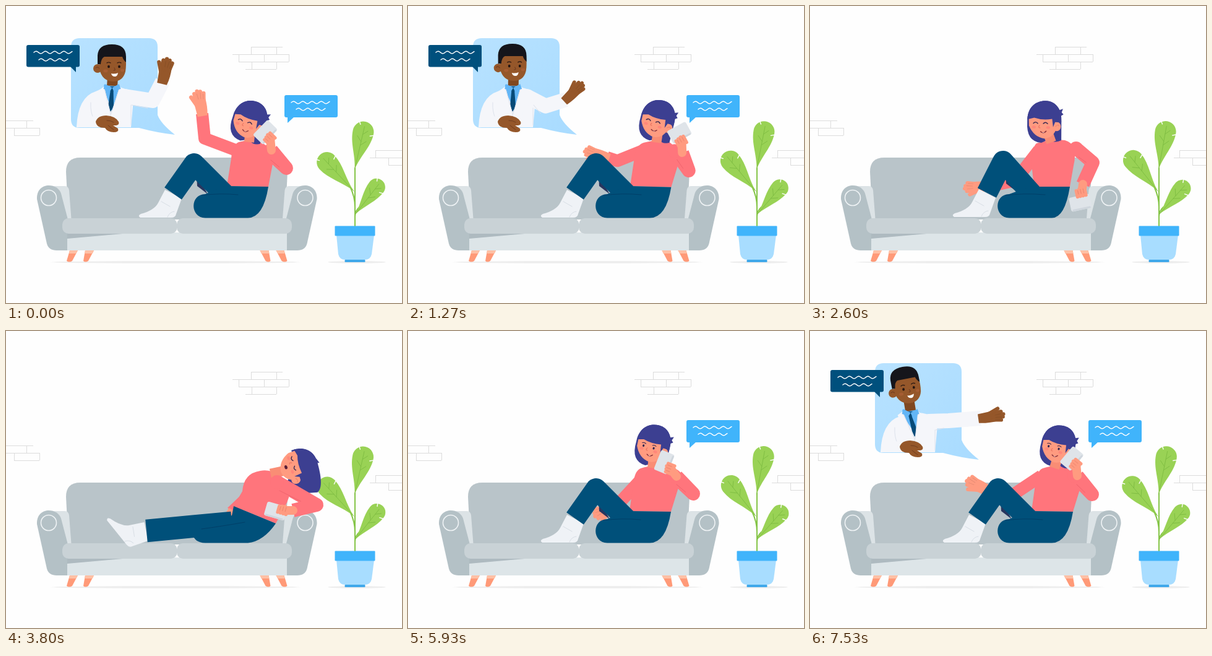
An HTML page with a canvas for the animation above (7.6 s loop, 640x480 px).

```html
<!DOCTYPE html>
<html lang="en">
<head>
<meta charset="utf-8">
<title>Call from the sofa</title>
<style>
html, body { margin: 0; width: 100%; height: 100%; overflow: hidden; background: #fefefe; }
canvas { display: block; }
</style>
</head>
<body>
<canvas id="stage" width="640" height="480"></canvas>
<script>
const c = document.getElementById('stage').getContext('2d');
const LOOP = 7600, RAD = Math.PI / 180;
const SKIN = '#ff9b80', SHIRT = '#ff757c', HAIR = '#3c3f91', JEANS = '#00507a', BROWN = '#95572a', COAT = '#f5f6fa';

// drawing helpers
const fill = (color, d) => { c.fillStyle = color; c.fill(new Path2D(d)); };
const line = (color, w, d, cap = 'round') => {
  c.strokeStyle = color; c.lineWidth = w; c.lineCap = cap; c.lineJoin = 'round';
  c.stroke(new Path2D(d));
};
const oval = (color, x, y, rx, ry = rx, rot = 0) => {
  c.fillStyle = color; c.beginPath(); c.ellipse(x, y, rx, ry, rot, 0, 7); c.fill();
};
const box = (color, x, y, w, h, r = 0) => {
  c.fillStyle = color; c.beginPath(); c.roundRect(x, y, w, h, r); c.fill();
};
function at(x, y, rot, draw, sx = 1, sy = sx) {
  c.save(); c.translate(x, y); c.rotate(rot * RAD); c.scale(sx, sy); draw(); c.restore();
}
const about = (x, y, scale, draw) => {
  if (scale > 0.01) at(x, y, 0, () => { c.translate(-x, -y); draw(); }, scale);
};

// keyframes: numbers, arrays and objects all blend with a smooth step
function mix(a, b, k) {
  if (typeof a === 'number') return a + (b - a) * k;
  if (Array.isArray(a)) return a.map((v, i) => mix(v, b[i], k));
  return Object.fromEntries(Object.keys(a).map(n => [n, mix(a[n], b[n], k)]));
}
function track(keys, t) {
  const i = keys.findIndex(k => k[0] > t);
  if (i < 0) return keys[keys.length - 1][1];
  if (!i) return keys[0][1];
  const [t0, a] = keys[i - 1], [t1, b] = keys[i], k = (t - t0) / (t1 - t0);
  return mix(a, b, k * k * (3 - 2 * k));
}

// torso: neck left, neck right, shoulder, side, waist right, waist left, left side
// left: shoulder, elbow, wrist, hand turn and breadth; right: shoulder, elbow, wrist, hand; phone and head: place, turn
const wave = {
  torso: [376,220, 408,218, 428,226, 432,250, 424,292, 357,291, 364,246],
  left: [374,234, 321,214, 317,174, -10, 1],
  right: [424,235, 453,262, 429,233, 427,214],
  phone: [419,204, 44],
  head: [388,190, 19], drop: 26, open: 0, sleep: 0,
  leg: [352,303, 304,255, 270,303], foot: 0, knee: 304
};
const clap = { ...wave, left: [374,236, 323,203, 294,168, 16, 0.72] };
const hangUp = { ...wave,
  torso: [384,221, 425,219, 440,225, 440,255, 426,293, 360,291, 366,250],
  left: [384,232, 346,273, 335,282, -115, 1],
  right: [434,234, 454,268, 450,239, 450,221],
  phone: [448,205, 70], head: [403,189, 14]
};
const sit = { ...hangUp,
  torso: [366,222, 412,217, 434,223, 426,258, 420,292, 362,292, 358,255],
  left: [370,233, 332,282, 287,292, -92, 0.9],
  right: [430,230, 457,253, 441,288, 439,302],
  phone: [437,318, 78], head: [375,192, 2],
  leg: [358,303, 312,251, 286,302]
};
const asleep = { ...sit,
  torso: [411,226, 442,233, 470,252, 450,285, 436,311, 368,283, 382,259],
  left: [416,239, 386,273, 365,293, -155, 0.9],
  right: [438,244, 502,281, 464,290, 448,290],
  phone: [436,291, 106], head: [464,216, 74], drop: -6, sleep: 1,
  leg: [365,310, 300,316, 227,323], foot: 51, knee: 318
};
const reply = { ...hangUp,
  torso: [376,222, 412,219, 432,226, 438,250, 425,292, 358,291, 364,248],
  right: [430,234, 461,263, 434,235, 424,222],
  phone: [414,212, 22], head: [391,189, 15], open: 1
};
const greet = { ...reply,
  left: [374,234, 326,266, 287,258, -62, 1],
  right: [427,234, 456,264, 432,234, 430,216],
  phone: [423,206, 40], head: [396,190, 15]
};
const girlKeys = [[0, wave], [730, clap], [900, clap], [1500, hangUp], [1880, hangUp], [2500, sit],
  [2720, sit], [3280, asleep], [4900, asleep], [5600, reply], [6400, reply], [7000, greet], [LOOP, greet]];

// doctor: head place and turn, elbow, wrist, hand turn and breadth
const docWave = { head: [173,98, 0], arm: [237,153, 253,122, 14, 1] };
const docClap = { head: [169,97, -2], arm: [224,160, 271,148, 31, 0.72] };
const docRest = { head: [171,97, 0], arm: [222,162, 252,152, 50, 0.9] };
const docReach = { head: [158,93, -11], arm: [224,145, 276,141, 82, 0.9] };
const docKeys = [[0, docWave], [730, docClap], [900, docClap], [1400, docRest], [6800, docRest], [7400, docReach]];

const blueKeys = [[0, 1], [1730, 1], [1900, 0], [5690, 0], [5850, 1.05], [5920, 1]];
const darkKeys = [[0, 1], [1400, 1], [1570, 0], [7270, 0], [7420, 1.16], [7510, 1]];
const callKeys = [[0, 1], [1530, 1], [1730, 0], [6500, 0], [6850, 1]];

function hand(skin, x, y, rot, breadth) {
  at(x, y, rot, () => {
    fill(skin, 'M-8 4L-10 -20Q-8 -28 0 -28L9 -26Q11 -10 8 4Z');
    for (let i = 0; i < 4; i++)
      line(skin, 6.4, `M${-6 + 4 * i} -20L${-7 + 5 * i} ${-38 + Math.abs(i - 1.3) * 3.4}`);
    line(skin, 6.4, 'M-6 -14L-13 -29');
    line('#00000018', 1, 'M-3 -33L-2 -24M3 -34L2 -24M7 -31L6 -23');
  }, breadth, 1);
}

function squiggle(x, y, w) {
  let d = `M${x} ${y}`;
  for (let i = 1; i <= w; i++) d += `L${x + i} ${y - 1.8 * Math.sin(i * 0.42)}`;
  line('#fff', 1.4, d);
}

function bricks() {
  line('#dcdcdc', 1, 'M396 66.5H447M366 78.5H457M376 90.5H457M387 102.5H437' +
    'M396.5 66V78M437.5 66V78M376.5 78V90M417.5 78V90M457.5 78V90M397.5 90V102M437.5 90V102' +
    'M0 185.5H44M0 197.5H54M13 209.5H54M33.5 185V197M13.5 197V209M54.5 197V209' +
    'M597 233.5H640M588 245.5H640M618 257.5H640M597.5 233V245M618.5 245V257', 'butt');
}

function sofaSide() {
  fill('#dce3e6', 'M74 291H95Q101 291 102 298L106 350V368H80Z');
  fill('#b4c1c6', 'M50 312C49 284 83 285 89 303L106 368V395H82Q69 395 66 384Z');
  c.strokeStyle = '#eff3f5'; c.lineWidth = 1.6;
  c.beginPath(); c.arc(69, 310, 12.5, 0, 7); c.stroke();
  fill('#ff9a78', 'M103 395H116L107 412Q102 415 98 412ZM128 395H142L133 412Q128 415 125 412Z');
  fill('#ffc0a5', 'M103 395H116L113 400H102ZM128 395H142L140 400H127Z');
}
function sofa() {
  oval('#ededed', 274, 414, 202, 1.8);
  fill('#b9c4c9', 'M101 345L97 268Q97 245 120 245H432Q455 245 455 268L451 345Z');
  sofaSide();
  c.save(); c.translate(552.5, 0); c.scale(-1, 1); sofaSide(); c.restore();
  box('#dde5e8', 99, 366, 355, 29);
  fill('#aebac0', 'M99 367H200L99 376Z');
  box('#c9d2d6', 91, 343, 185.5, 25, 10);
  box('#c9d2d6', 276, 343, 186, 25, 10);
}

// a leaf points up from its base
function leaf(x, y, rot, len, r) {
  at(x, y, rot, () => {
    const top = -len, m = top + r;
    fill('#99d255', `M0 0C-4 ${-len * 0.3} ${-r} ${m + r * 1.3} ${-r} ${m}A${r} ${r} 0 0 1 ${r} ${m}C${r} ${m + r * 1.3} 4 ${-len * 0.3} 0 0Z`);
    line('#7fbd43', 0.9, `M0 0V${top + 8}M0 ${m + 16}l-8 -8M0 ${m + 22}l8 -8M0 ${m + 4}l7 -7`);
    line('#fefefe', 1.4, `M${r} ${m + 2}l-5 2M${-r * 0.6} ${top + 1}l3 5`);
  });
}
function plant(t) {
  const sway = (1 - Math.cos(t / 4300 * 2 * Math.PI)) / 2;
  oval('#ededed', 567, 414, 47, 1.8);
  line('#85c548', 2, 'M564 357V262M564 325Q564 308 556 292M564 340Q564 332 571 325');
  leaf(563.5, 264, 13 - 3 * sway, 79, 17);
  leaf(562, 299, -43 + 5 * sway, 80, 16.5);
  leaf(565, 336, 38 + 4 * sway, 69, 14);
  fill('#a8ddff', 'M534 370H595L591 401Q589 410 580 410H548Q539 410 537 401Z');
  box('#40b4fb', 531.5, 355.5, 65, 16, 1);
  box('#40a8ea', 547.5, 410, 33, 4, 1);
}

function girlHead({ head: [x, y, rot], drop, open, sleep }, neckX, neckY) {
  const hang = (a, b) => mix(a, b, sleep);
  at(x, y, rot, () => {
    // the loose side of the bob falls towards the ground
    fill(HAIR, `M-24 -4C-25 -29 -10 -39 5 -39C21 -39 ${hang(31, 48)} ${hang(-26, -38)} ${hang(31, 53)} ${hang(-10, -26)}` +
      `L${hang(32, 48)} ${hang(24, -2)}Q${hang(22, 40)} ${hang(30, 15)} ${hang(12, 26)} ${hang(23, 19)}` +
      `L0 ${drop + 3}Q-25 ${drop + 2} -24 -4Z`);
    c.translate(-25 * sleep, -15 * sleep);
    fill(HAIR, 'M25 -24L33 -27L31 -21L34 -18L28 -14Z');
  });
  line('#f98d75', 16, `M${neckX} ${neckY}L${x + 7 * (1 - sleep)} ${y + 6}`, 'butt');
  at(x, y, rot, () => {
    fill(SKIN, 'M-22 -16H24V4Q19 21 4 22Q-13 20 -21 2Z');
    oval(SKIN, 24, 2, 6.5, 7.5);
    line('#e8806c', 1, 'M22 2Q25 -2 28 1');
    fill(HAIR, 'M-24 -8C-24 -30 -9 -39 5 -39C21 -39 31 -26 31 -5H21L18 3L16 -10Q0 -7 -13 -11Z');
    oval('#ff887a', -13, 4, 3.2, 2.2);
    oval('#ff887a', 10, 4, 3.2, 2.2);
    const ink = '#33264f', bend = sleep > 0.5 ? 4 : -4;
    if (open > 0.5) {
      oval(ink, -11, -1, 1.6, 2); oval(ink, 6, -1, 1.6, 2);
      line(ink, 1, 'M-14 -5Q-11 -7 -8 -5M3 -5Q6 -7 9 -5');
    } else {
      line(ink, 1.4, `M-14 -2q3.5 ${bend} 7 0M2 -2q3.5 ${bend} 7 0`);
    }
    line('#e8735f', 1.1, 'M-4 1Q-7 5 -3 5');
    if (sleep > 0.5) oval('#5b2038', 0, 12, 3.2, 2.4);
    else {
      line('#7b2430', 1.3, 'M-2 11Q3 15 7 10');
      fill('#fff', 'M0 12Q3 13 5 11.5Q3 14 0 12Z');
    }
  });
}

function girl(p, t) {
  const T = p.torso, L = p.left, R = p.right, [hx, hy, kx, ky, ax, ay] = p.leg;
  // far arm
  line(SHIRT, 20, `M${L[0]} ${L[1]}L${L[2]} ${L[3]}L${L[4]} ${L[5]}`, 'butt');
  hand(SKIN, ...L.slice(4));
  // torso
  fill(SHIRT, `M${T[0]} ${T[1]}Q${(T[0] + T[2]) / 2} ${Math.min(T[1], T[3]) - 3} ${T[2]} ${T[3]}Q${T[4]} ${T[5]} ${T[6]} ${T[7]}` +
    `L${T[8]} ${T[9]}L${T[10]} ${T[11]}L${T[12]} ${T[13]}Q${T[12] + 2} ${T[1] + 4} ${T[0]} ${T[1]}Z`);
  const breath = p.sleep * Math.sin(t / 260);
  p.head = [p.head[0], p.head[1] + breath, p.head[2]];
  girlHead(p, (T[0] + T[2]) / 2 + 1, (T[1] + T[3]) / 2 + 1);
  // legs
  at(ax, ay, p.foot, () => {
    fill('#eff2f6', 'M-13 -6L14 8L5 33Q4 39 -3 39H-53Q-58 36 -52 33Q-30 27 -24 15Z');
    line('#d8dee5', 1, 'M-19 13L-5 21M-9 38Q-6 30 2 29');
  });
  const low = v => Math.min(v, 335);
  fill('#28365f', `M${kx + 4} ${low(ky + 18)}L${kx + 22} ${low(ky + 49)}L${kx + 5} ${low(ky + 36)}Z`);
  line(JEANS, 34 + 2.5 * p.sleep, `M${ax} ${ay}L${kx} ${ky}L${hx} ${hy}`, 'butt');
  const k = p.knee, seat = T[8] - 8 - 12 * p.sleep;
  fill(JEANS, `M322 ${k}L${hx} ${hy - 12}L${T[10]} ${T[11]}L${T[8]} ${T[9]}Q${seat} ${342 - 2 * p.sleep} 391 342.5H322` +
    `C297 342 297 ${k} 322 ${k}Z`);
  line('#003f68', 1, `M316 ${k + 2}Q346 ${k - 2} ${T[10] + 18} ${k + 1 - 10 * p.sleep}`);
  // near arm with phone
  line(SHIRT, 22, `M${R[0]} ${R[1]}L${R[2]} ${R[3]}L${R[4]} ${R[5]}`, 'butt');
  oval(SHIRT, R[0], R[1], 11);
  line('#ee626d', 0.9, `M${R[0] + 4} ${R[1] + 14}L${mix(R[0], R[2], 0.6)} ${mix(R[1], R[3], 0.6) + 9}`);
  line(SKIN, 14, `M${R[4]} ${R[5]}L${R[6]} ${R[7]}`);
  at(...p.phone, () => {
    box('#dfe4e9', -11.5, -17, 23, 34, 3);
    box('#cfd6dd', 8.5, -15, 3, 30, 1.5);
  });
  at(R[6], R[7], p.phone[2], () => {
    for (let i = 0; i < 4; i++) line(SKIN, 5.5, `M5 ${-6 + 4.6 * i}H${-7 + Math.abs(i - 1)}`);
    line('#e8806c', 0.8, 'M-6 -3.5H1M-6 1H1M-5 5.5H1');
  });
}

function doctor({ head: [hx, hy, rot], arm: [ex, ey, wx, wy, turn, breadth] }) {
  const g = c.createLinearGradient(105, 52, 245, 197);
  g.addColorStop(0, '#b8e2ff'); g.addColorStop(1, '#aadcff');
  fill(g, 'M119 52H231Q245 52 245 66V176Q250 190 273 208Q245 205 215 197H119Q105 197 105 183V66Q105 52 119 52Z');
  const n = 171 + (hx - 172) * 0.6;
  fill(COAT, `M114 196Q116 147 145 138L${n - 13} 132H${n + 13}Q202 134 206 152L202 196Z`);
  fill('#63b6f6', `M${n - 13} 127H${n + 10}L${n + 14} 134L172 170L${n - 14} 134Z`);
  fill('#074a78', `M${n - 5} 130H${n + 4}L${n + 2} 138L174 162L169 171L165 162L${n - 3} 138Z`);
  fill(COAT, `M${n - 13} 130L169 174L160 180L${n - 21} 136ZM${n + 12} 130L170 174L184 182L${n + 22} 137Z`);
  line('#dde2ec', 1, `M${n - 13} 132L169 174V182M${n + 12} 132L170 174M137 156Q136 172 142 183M202 160V192`);
  // waving arm
  line(COAT, 24, `M192 146L${ex} ${ey}L${wx} ${wy}`, 'butt');
  line('#dde2ec', 1, `M203 160L${ex - 8} ${ey + 12}`);
  oval(COAT, 192, 146, 12);
  hand(BROWN, wx, wy, turn, breadth);
  // resting hand
  fill(COAT, 'M118 180L148 178L150 196H114Z');
  fill(BROWN, 'M145 187Q148 177 162 177Q177 178 182 187Q184 192 178 193L173 193L181 198Q183 204 174 204Q164 204 160 197Q146 197 145 187Z');
  line('#6d3a20', 0.9, 'M165 193L174 200M163 185Q170 185 174 188');
  // head
  line('#80481f', 17, `M${n} 129L${hx} ${hy + 8}`, 'butt');
  fill('#63b6f6', `M${n - 12} 126L${n} 132L${n + 11} 126L${n + 14} 134L${n + 2} 137L${n} 132L${n - 3} 137L${n - 14} 134Z`);
  at(hx, hy, rot, () => {
    oval(BROWN, -25, 3, 7);
    line('#6d3a20', 1, 'M-28 2Q-25 -1 -22 3');
    fill(BROWN, 'M-22 -18H20Q22 -4 20 8Q16 24 0 24Q-18 23 -22 4Z');
    fill('#15151b', 'M-25 -4V-18Q-24 -36 -2 -36Q21 -36 21 -16V-7Q17 -10 15 -16H-14Q-19 -14 -20 -4Z');
    oval('#241511', -7, 0, 1.9, 2.2); oval('#241511', 10, 0, 1.9, 2.2);
    line('#241511', 1.2, 'M-10 -6Q-7 -8 -4 -6M7 -6Q10 -8 13 -6');
    line('#6d3a20', 1.1, 'M2 2Q5 6 1 6');
    oval('#a65d33', -12, 7, 3.6, 2.4); oval('#a65d33', 15, 6, 3, 2.4);
    fill('#fff', 'M-3 11Q3 12.5 8 10Q7 16 3 16Q-2 16 -3 11Z');
  });
}

function blueNote() {
  box('#40b4fb', 450, 144, 86, 36, 3);
  fill('#40b4fb', 'M455 178V189L466 179Z');
  squiggle(461, 156, 62);
  squiggle(469, 167, 47);
}
function darkNote() {
  box('#00507d', 33, 63, 86, 35.5, 3);
  fill('#00507d', 'M103 97L113 107V97Z');
  squiggle(45, 75, 62);
  squiggle(53, 87, 47);
}

function draw(now) {
  const t = now % LOOP;
  c.fillStyle = '#fefefe';
  c.fillRect(0, 0, 640, 480);
  bricks();
  sofa();
  plant(t);
  about(272, 208, track(callKeys, t), () => doctor(track(docKeys, t)));
  about(113, 107, track(darkKeys, t), darkNote);
  about(455, 188, track(blueKeys, t), blueNote);
  girl({ ...track(girlKeys, t) }, t);
}
const start = performance.now();
(function loop() {
  draw(performance.now() - start);
  requestAnimationFrame(loop);
})();
</script>
</body>
</html>
```
